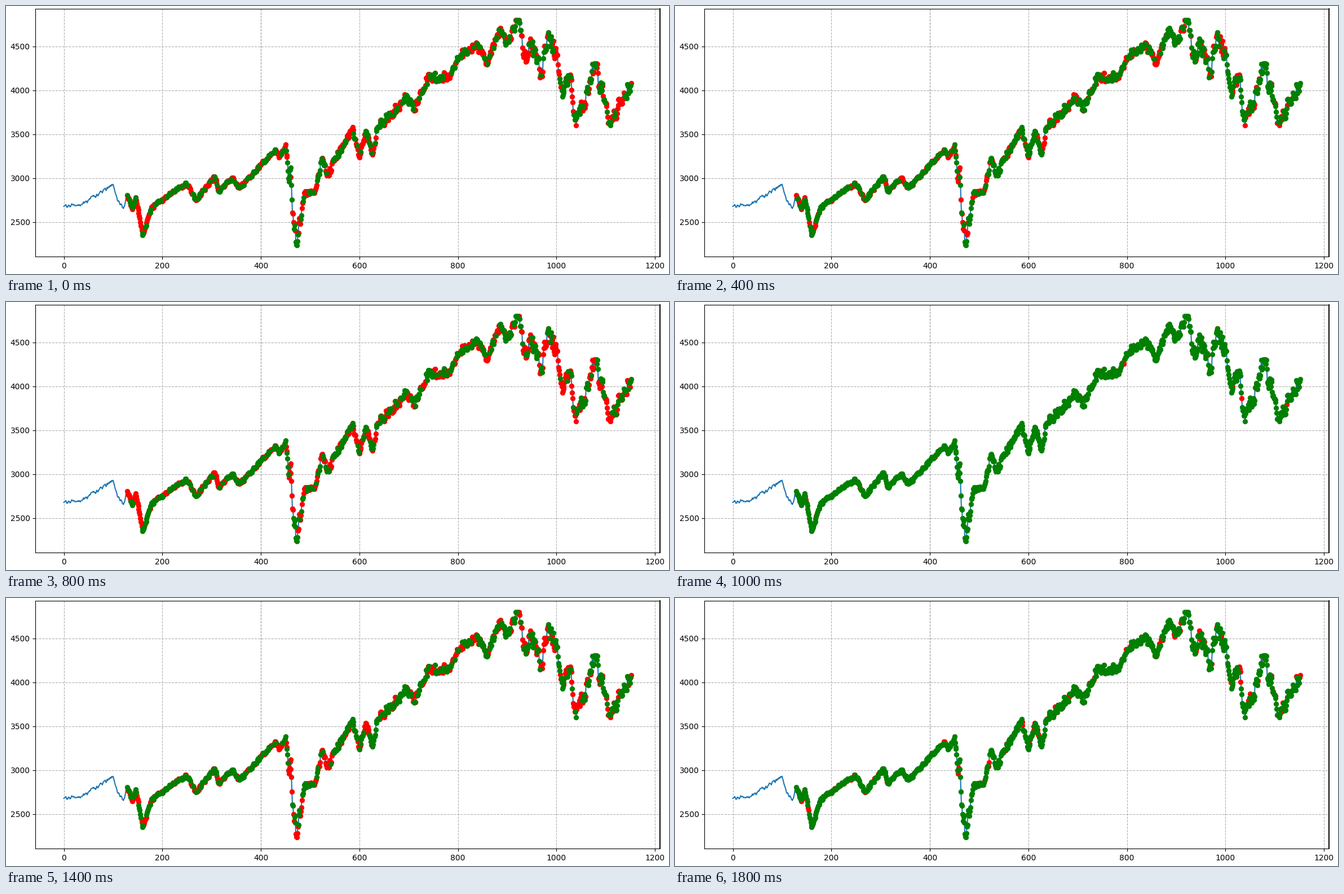
These frames come from a looping animation (1176 by 476 pixels, 2 s). A matplotlib script:

```python
import numpy as np
import matplotlib.pyplot as plt
from matplotlib.animation import FuncAnimation

W, H, DPI = 1176, 476, 100
DAYS, START, FRAMES = 1153, 129, 10
LOW, HIGH = 2237, 4797

# Main turning points of the index: (day, price).
TURNS = np.array([
    (0, 2680), (37, 2703), (100, 2931), (109, 2745), (121, 2656),
    (129, 2810), (139, 2650), (146, 2780), (160, 2351), (178, 2670),
    (248, 2945), (268, 2750), (306, 3020), (314, 2850), (341, 3005),
    (356, 2888), (430, 3329), (437, 3235), (450, 3386), (457, 2960),
    (460, 3120), (466, 2500), (473, LOW), (488, 2830), (509, 2830),
    (525, 3232), (534, 3030), (586, 3580), (600, 3237), (613, 3534),
    (627, 3270), (635, 3560), (697, 3930), (711, 3770), (742, 4180),
    (759, 4130), (785, 4180), (801, 4370), (838, 4536), (860, 4300),
    (885, 4700), (900, 4540), (921, HIGH), (938, 4326), (947, 4589),
    (968, 4170), (982, 4631), (999, 4440), (1012, 3930), (1028, 4176),
    (1037, 3667), (1055, 3820), (1078, 4305), (1110, 3600), (1129, 3880),
    (1139, 3960), (1152, 4080),
])

# Share of red days in each step.
SHARE = [.6, .55, .42, .86, .6, .03, .5, .5, .45, .15]

rng = np.random.default_rng(12)


def smooth_noise(width):
    return np.convolve(rng.normal(size=DAYS), np.ones(width) / width ** .5, "same")


def make_prices():
    trend = np.interp(day, *TURNS.T)
    gap = np.abs(day[:, None] - TURNS[:, 0]).min(axis=1)
    crash = .045 * np.exp(-((day - 468) / 11) ** 2)
    volatility = np.interp(day, [0, 440, 500, 900, 960], [.004, .004, .008, .007, .014])
    wobble = np.clip(smooth_noise(2), -1.8, 1.8) * np.minimum(gap / 3, 1)
    return np.clip(trend * (1 + wobble * (volatility + crash)), LOW, HIGH)


def make_signal(share):
    noise = smooth_noise(2)
    return noise < np.quantile(noise, share)


day = np.arange(DAYS)
price = make_prices()
signals = [make_signal(share) for share in SHARE]

fig = plt.figure(figsize=(W / DPI, H / DPI), dpi=DPI, facecolor="white")
ax = fig.add_axes([52.3 / W, 1 - 445 / H, 1107.2 / W, 439.7 / H])
ax.set_xlim(-57.6, 1209.6)
ax.set_ylim(2109, 4925)
ax.set_xticks(range(0, 1201, 200))
ax.set_yticks(range(2500, 4501, 500))
ax.grid(linestyle="--", color="#b0b0b0", linewidth=.8)
ax.get_xgridlines()[2].set_color("#969696")
ax.spines["right"].set_linewidth(1.4)

ax.plot(day, price, color="#1f77b4", linewidth=1.5)
style = dict(linestyle="", marker="o", markersize=6, markeredgewidth=.7)
sells, = ax.plot([], [], color="red", **style)
buys, = ax.plot([], [], color="green", **style)


def update(step):
    red, active = signals[step], day >= START
    for dots, mask in ((sells, active & red), (buys, active & ~red)):
        dots.set_data(day[mask], price[mask])
    return sells, buys


anim = FuncAnimation(fig, update, frames=FRAMES, interval=200,
                     repeat=True, repeat_delay=0, blit=False)
plt.show()
```
